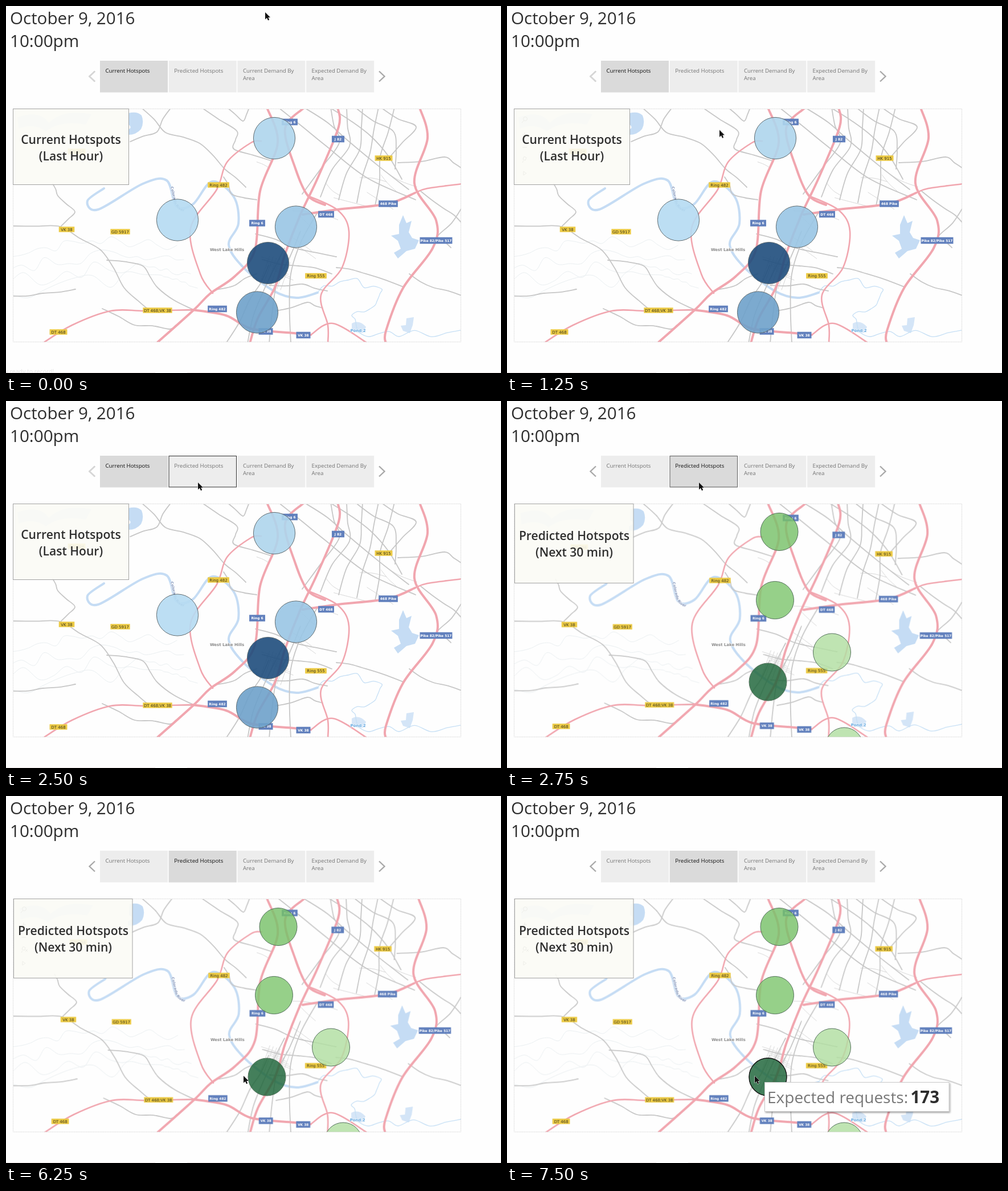
These frames come from a looping animation (869 px wide and 644 px high, 8000 ms). An HTML page:

```html
<!DOCTYPE html>
<html lang="en">
<head>
<meta charset="utf-8">
<title>Hotspot map</title>
<style>
html, body { margin: 0; width: 100%; height: 100%; overflow: hidden; background: #fefefe; }
svg { display: block; width: 869px; height: 644px; font-family: "Open Sans", "Noto Sans", sans-serif; }
.title { font-size: 29.6px; fill: #2e2e2e; }
.tab rect { fill: #ededed; }
.tab text { font-size: 9.7px; fill: #747474; }
.tab.on rect { fill: #dadada; }
.tab.on text { fill: #111; }
.chevron { fill: none; stroke: #a9a9a9; stroke-width: 2.4; }
.legend rect { fill: #fbfbf6; fill-opacity: .9; stroke: #a3a3a3; }
.legend text { font-size: 21.1px; font-weight: 600; fill: #2f2f2f; text-anchor: middle; }

#roads path { fill: none; stroke-linecap: round; stroke-linejoin: round; }
#roads .river { stroke: #c5dcf4; stroke-width: 4; }
#roads .creek { stroke: #c5dff5; stroke-width: 1.3; }
#roads .faint { stroke: #e9eef0; stroke-width: 1; }
#roads .lane { stroke: #d6d6d6; stroke-width: 1; }
#roads .road { stroke: #c7c7c7; stroke-width: 1.8; }
#roads .ring { stroke: #f1a6af; stroke-width: 2.6; }
#roads .main { stroke: #f1a6af; stroke-width: 4; }
.lake { fill: #c5dcf4; }
#labels { font-family: "DejaVu Sans", sans-serif; text-anchor: middle; }
.yellow rect { fill: #ecca45; }
.yellow text { font-size: 7px; fill: #3b361c; }
.blue rect { fill: #6180bd; }
.blue text { font-size: 5.9px; font-weight: bold; fill: #fff; }
.place { font-size: 7px; font-weight: bold; fill: #8a8a8a; stroke: #fff; stroke-width: 1.2; paint-order: stroke; }
.spots circle { stroke: #5f6b70; fill-opacity: .9; }
.spots.next circle { stroke: #53705a; fill-opacity: .82; }

.anim { animation: 8s step-end infinite; }
#map { transform-origin: 490px 425px; animation-name: zoom; }
.first { animation-name: first; }
.second { animation-name: second; }
#tools { animation-name: tools; }
#hover { animation-name: hover; }
#tip { animation-name: tip; }
#picked { animation-name: picked; }
#note { animation-name: note; }
#cursor { animation-name: cursor; }
@keyframes zoom { 0% { transform: none; } 34.375%, 100% { transform: scale(.9923); } }
@keyframes first { 0% { opacity: 1; } 34.375%, 100% { opacity: 0; } }
@keyframes second { 0% { opacity: 0; } 34.375%, 100% { opacity: 1; } }
@keyframes tools { 0% { opacity: 0; } 9.375% { opacity: 1; } 28.125% { opacity: 0; } 68.75%, 100% { opacity: 1; } }
@keyframes hover { 0% { opacity: 0; } 28.125% { opacity: 1; } 34.375% { opacity: .75; } 65.625%, 100% { opacity: 0; } }
@keyframes tip { 0% { opacity: 0; } 81.25% { opacity: .5; } 84.375%, 100% { opacity: 1; } }
@keyframes picked { 0% { opacity: 0; } 81.25%, 100% { opacity: 1; } }
@keyframes note { 0% { opacity: 1; } 3.125%, 100% { opacity: 0; } }
@keyframes cursor {
  0% { transform: translate(455px, 11px); }
  3.125% { transform: translate(376px, 215px); }
  6.25% { transform: translate(374px, 223px); }
  15.625% { transform: translate(373px, 217.5px); }
  25% { transform: translate(351px, 186px); }
  28.125% { transform: translate(339px, 145px); }
  31.25% { transform: translate(337px, 143px); }
  65.625% { transform: translate(329.5px, 165.5px); }
  68.75% { transform: translate(319px, 310px); }
  71.875% { transform: translate(351px, 431px); }
  75% { transform: translate(376px, 471px); }
  78.125% { transform: translate(417px, 491px); }
  81.25%, 100% { transform: translate(435px, 491px); }
}
</style>
</head>
<body>
<svg viewBox="0 0 869 644">
  <defs>
    <clipPath id="frame"><rect x="13" y="181" width="785.5" height="408.5"/></clipPath>
    <filter id="shadow" x="-5%" y="-20%" width="110%" height="150%">
      <feDropShadow dx="1.5" dy="2" stdDeviation="1.6" flood-opacity=".35"/>
    </filter>
    <path id="bend" d="M289 317Q293 336 296 347Q302 361 320 362"/>
    <path id="back" class="chevron" d="M156 114.5L146.5 123.5L156 132.5"/>
  </defs>

  <text class="title" x="7" y="32">October 9, 2016</text>
  <text class="title" x="7" y="72">10:00pm</text>

  <g id="tabs"></g>
  <use href="#back"/>
  <use href="#back" transform="matrix(-1 0 0 1 811 0)"/>
  <g class="anim first"><path class="chevron" style="stroke:#d8d8d8" d="M156 114.5L146.5 123.5L156 132.5"/></g>
  <rect id="hover" class="anim" x="286" y="96.5" width="118.5" height="54.5" fill="none" stroke="#333"/>

  <g clip-path="url(#frame)">
    <rect x="13" y="181" width="786" height="409" fill="#fefefe"/>
    <g id="map" class="anim">
      <path class="lake" d="M215 188Q230 184 238 192Q243 204 237 216Q228 227 212 226V218Q224 214 214 207Z"/>
      <path class="lake" d="M20 195Q60 182 75 205Q100 180 150 190L140 208Q95 200 70 220Q50 205 22 215Z" opacity=".6"/>
      <path class="lake" d="M697 367L703 381L712 377L707 397L713 407L725 411L718 426L703 430L688 443L681 433L693 426L688 412L676 403L690 400V384Z"/>
      <path class="lake" d="M703 548L716 546L714 560L709 574L697 570L693 561L702 560Z" opacity=".75"/>
      <path class="lake" d="M607 557Q620 550 632 563L628 573Q614 576 607 566Z" opacity=".7"/>
      <g id="roads"></g>
      <g id="labels">
        <text class="place" x="388" y="430">West Lake Hills</text>
        <text class="place" x="618" y="572" style="fill:#62a8e0">Pond 2</text>
        <text class="place" style="fill:#8093b8;font-size:6.4px;text-anchor:start"><textPath href="#bend">Colorado River</textPath></text>
      </g>
    </g>
    <g class="spots anim first">
      <circle cx="471" cy="232" r="36.6" fill="#aed5ed"/>
      <circle cx="301" cy="375.5" r="36.6" fill="#b5dbf2"/>
      <circle cx="509" cy="387.5" r="36.6" fill="#9ac6e5"/>
      <circle cx="460" cy="451" r="36.6" fill="#1f4d7d"/>
      <circle cx="441" cy="537.5" r="36.6" fill="#6ea1ca"/>
    </g>
    <g class="spots next anim second">
      <circle cx="478" cy="229.5" r="33" fill="#78c16a"/>
      <circle cx="470.5" cy="349.5" r="33" fill="#7fc670"/>
      <circle cx="570.5" cy="441" r="33" fill="#b1dea1"/>
      <circle cx="458" cy="493" r="33" fill="#1b6338"/>
      <circle cx="592" cy="606" r="33" fill="#b1dea1"/>
    </g>
    <circle id="picked" class="anim" cx="458" cy="493" r="33" fill="none" stroke="#111" stroke-width="1.3"/>
  </g>
  <rect x="12.5" y="180.5" width="786" height="409" fill="none" stroke="#dcdcdc" stroke-dasharray="2 1"/>

  <g id="tools" class="anim" fill="none" stroke="#777">
    <circle cx="32" cy="198" r="3.5"/>
    <path d="M29.5 201L26 205M27 248h8M31 222v8M27 226h8M30 264l4 2l-2 5l-4 -2ZM29 271l-2 4M29 290v7l5 -3.5Z"/>
    <path class="anim second" d="M34 269l4 4m0 -4l-4 4"/>
  </g>
  <g class="legend anim first">
    <rect x="12.5" y="180.5" width="203" height="133"/>
    <text x="114" y="241.5">Current Hotspots</text>
    <text x="114" y="271">(Last Hour)</text>
  </g>
  <g class="legend anim second">
    <rect x="13.5" y="180.5" width="208.5" height="139"/>
    <text x="118" y="243.5">Predicted Hotspots</text>
    <text x="118" y="273">(Next 30 min)</text>
  </g>

  <g id="tip" class="anim">
    <rect x="452.5" y="502.5" width="323.5" height="51" fill="#fff" stroke="#c9c9c9" filter="url(#shadow)"/>
    <text x="457" y="539" font-size="28" fill="#777">Expected requests:</text>
    <text x="708.5" y="539" font-size="29.5" font-weight="700" fill="#2d2d2d">173</text>
  </g>

  <path d="M0 643.5H262M318 643.5H869" stroke="#f1eaea"/>
  <text id="note" class="anim" x="-4" y="645" font-size="10.5" fill="#e6e6e6">ly ready to record!</text>
  <path id="cursor" class="anim" d="M0 0V12.5L3 9.8L5 14.3L7.2 13.3L5.3 9H9Z" fill="#111" stroke="#fff" paint-order="stroke"/>
</svg>

<script>
const $ = id => document.getElementById(id);

let seed = 11;
function random(min, max) {
  seed = (seed * 16807) % 2147483647;
  return min + (max - min) * seed / 2147483647;
}

function add(parent, name, attrs = {}, text = '') {
  const el = document.createElementNS('http://www.w3.org/2000/svg', name);
  for (const key in attrs) el.setAttribute(key, attrs[key]);
  el.textContent = text;
  return parent.appendChild(el);
}

// Cut every stretch into parts and push the cuts sideways
function roughen(points, wobble, parts) {
  return points.flatMap((a, i) => {
    const b = points[i + 1];
    if (!b) return [a];
    const dx = b[0] - a[0], dy = b[1] - a[1], out = [a];
    for (let k = 1; k < parts; k++) {
      const f = k / parts, off = random(-wobble, wobble);
      out.push([a[0] + dx * f - dy * off, a[1] + dy * f + dx * off]);
    }
    return out;
  });
}

// Smooth curve through "x,y x,y ..."
function line(kind, keys, wobble = 0, parts = 2) {
  let p = keys.split(' ').map(s => s.split(',').map(Number));
  if (wobble) p = roughen(p, wobble, parts);
  let d = 'M' + p[0];
  for (let i = 0; i < p.length - 1; i++) {
    const a = p[i - 1] || p[i], b = p[i], c = p[i + 1], e = p[i + 2] || c;
    const near = [0, 1].map(k => b[k] + (c[k] - a[k]) / 6);
    const far = [0, 1].map(k => c[k] - (e[k] - b[k]) / 6);
    d += `C${near} ${far} ${c}`;
  }
  add($('roads'), 'path', { class: kind, d });
}

const road = keys => line('road', keys, .06);

function badge(kind, x, y, text) {
  const blue = kind === 'blue';
  const width = 10.5 + text.length * (blue ? 2.9 : 3.4), height = blue ? 11.5 : 9.5;
  const g = add($('labels'), 'g', { class: kind });
  add(g, 'rect', { x: x - width / 2, y: y - height / 2, width, height });
  add(g, 'text', { x, y: y + (blue ? 2.2 : 2.6) }, text);
}

function tab(i, state = '') {
  const lines = ['Current Hotspots', 'Predicted Hotspots', 'Current Demand By|Area', 'Expected Demand By|Area'][i].split('|');
  const x = 165 + 120.7 * i;
  const g = add($('tabs'), 'g', { class: 'tab ' + state });
  add(g, 'rect', { x, y: 96, width: 119, height: 55.5 });
  lines.forEach((s, k) => add(g, 'text', { x: x + 9.5, y: 116.5 + 13.5 * k }, s));
}

for (let i = 0; i < 4; i++) tab(i);
tab(0, 'on anim first');
tab(1, 'on anim second');

// Water
line('river', '172,320 143,342 162,357 240,312 282,306 299,351 328,348 362,308 400,335 408,382 391,419 416,458 470,500 510,512 547,503');
line('creek', '547,503 600,481 660,497 648,525 607,543 620,573 690,580 802,568', .12, 4);
for (let i = 0; i < 4; i++) {
  line('faint', `8,${440 + i * 22} ${150 + i * 40},${412 + i * 20} ${300 + i * 12},${420 + i * 25}`, .06, 9);
}

// Side streets and the downtown grid
for (let i = 0; i < 7; i++) {
  line('lane', `${448 + i * 5},${440 + i * 5} ${480 + i * 4},${451 + i * 5}`);
  line('lane', `${463 + i * 6},${438 + i * 2} ${446 + i * 6},${486 + i * 2}`);
}
for (let i = 0; i < 12; i++) {
  const x = random(440, 680), y = random(270, 450);
  line('lane', `${x},${y} ${x + random(20, 60)},${y + random(-15, 30)}`, .1);
}

// Country roads
road('8,386 95,387 166,428 207,494 258,536 328,534');
road('82,312 91,333 121,361 97,386');
road('177,446 240,456 266,494 327,532');
road('169,531 226,560 287,567 308,552');
road('8,509 65,504 122,497');
road('237,178 280,222 340,241 384,286 421,318');
road('290,178 265,221 218,238');
road('343,178 405,219 400,251 467,272');
road('388,178 416,202 427,178');
road('382,300 396,330 440,340');
road('366,498 402,490 440,470');
road('688,275 770,265 802,286');
road('728,325 768,355 802,383');
road('781,424 757,405 802,351');
road('708,470 750,494 802,509');
road('580,459 625,468 698,493');

// Northern avenues run south-east, cross streets follow the highway
for (let i = 0; i < 5; i++) {
  road(`${478 + 45 * i},178 ${560 + 40 * i},${244 - 8 * i} ${719 - 12 * i},${340 - 18 * i}`);
  road(`${570 + 28 * i},178 ${585 + 18 * i},${240 + 6 * i} ${520 + 32 * i},${330 + 5 * i}`);
}
for (let i = 0; i < 4; i++) {
  road(`${545 - 28 * i},${365 + 30 * i} ${500 - 24 * i},${470 + 15 * i} ${500 - 38 * i},592`);
  road(`${438 + 12 * i},${400 + 45 * i} ${505 + 8 * i},${424 + 32 * i} ${580 - 8 * i},${440 + 30 * i}`);
}

// Highways
line('ring', '448,237 430,240 388,274 370,322 324,390 341,470 363,504');
line('ring', '64,592 116,560 184,535 245,535 326,533');
line('ring', '530,333 582,358 602,395 590,459 553,507 565,560 565,592');
line('ring', '535,577 574,557 635,592');
line('main', '458,178 477,240 446,325 437,428 402,474 358,505 330,533 264,592');
line('main', '524,178 490,215 508,285 530,333 560,349');
line('main', '582,178 584,212 548,300 516,368 490,435 473,492 442,548 428,592');
line('main', '326,533 386,543 430,566 505,574 535,577');
line('main', '521,366 583,357 670,347 718,328');
line('ring', '718,328 740,320 802,312');
line('main', '726,178 740,232 717,311 755,376 749,425 697,495 667,570 667,592');

badge('yellow', 373, 314, 'Ring 482');
badge('yellow', 663, 267, 'HK 915');
badge('yellow', 106.5, 392, 'VK 38');
badge('yellow', 200.5, 396, 'GD 5917');
badge('yellow', 544, 473.5, 'Ring 555');
badge('yellow', 266, 534, 'DT 468;VK 38');
badge('yellow', 92, 572, 'DT 468');
badge('yellow', 124, 255, 'GD 604');
badge('blue', 498, 203.5, 'Ring 6');
badge('blue', 583, 233.5, 'J 82');
badge('blue', 671, 347, '468 Pike');
badge('blue', 562, 365.5, 'DT 468');
badge('blue', 441, 381, 'Ring 6');
badge('blue', 755, 411.5, 'Pike 82/Pike 517');
badge('blue', 371, 531.5, 'Ring 482');
badge('blue', 522, 577.5, 'VK 38');
badge('blue', 456, 571, 'VK 38');
</script>
</body>
</html>
```
